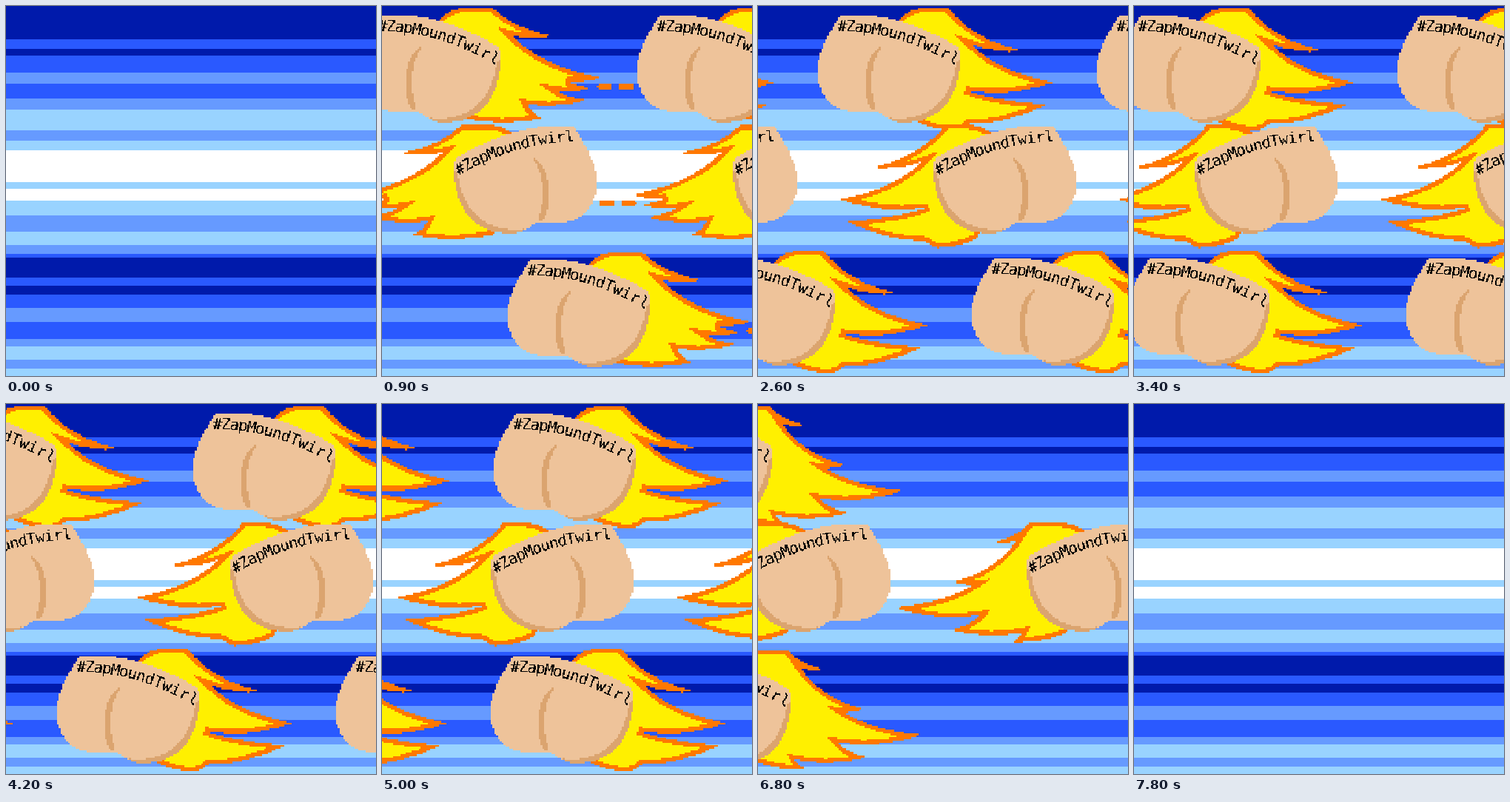
These frames come from a looping animation (500x500 px, 8000 ms). An HTML page with a canvas:

```html
<!DOCTYPE html>
<html lang="en">
<head>
<meta charset="utf-8">
<title>Comet parade</title>
<style>
  html, body { margin: 0; width: 100%; height: 100%; overflow: hidden; background: #001aab; }
  canvas { display: block; width: 100%; height: 100%; image-rendering: pixelated; }
</style>
</head>
<body>
<canvas id="stage" width="500" height="500"></canvas>
<script>
const stage = document.getElementById('stage').getContext('2d');
const LABEL = '#ZapMoundTwirl';
const STEP = 100, STEPS = 80, GAP = 377;
const SPRITE_W = 380, SPRITE_H = 180, BODY_W = 195;
const SKIN = '#eec39a', SHADE = '#dba46f', ORANGE = '#ff7800', YELLOW = '#fff000';

// Background: colour key and lower edge of each stripe.
const BLUES = { D: '#001aab', M: '#2a59ff', L: '#669aff', P: '#99d3ff', W: '#ffffff' };
const STRIPES = 'D45 M58 D67 M90 L105 M125 L140 P168 L182 P195 W238 P247 W263 P283 L305 ' +
  'P323 L335 M340 D367 M378 D390 M408 L427 M450 L460 P478 L490 P500';

const BODY = 'M34,12 L62,12 Q120,14 190,54 Q198,62 195,80 Q187,156 120,157 Q98,157 84,142 ' +
  'L52,142 Q18,142 6,110 Q-11,78 34,12Z';
const CREASE = 'M87,55 Q66,68 67,110 Q68,132 76,140 L82,139 Q75,125 75,100 Q76,72 88,57Z';
const UNDERSIDE = 'M195,70 L195,80 Q187,156 120,157 Q105,157 98,151 L118,152 Q178,148 190,78Z';

// The fire's four poses: crown, then tips and notches in turn, ending under the body.
const FLAMES = [
  { keys: '190,2 239,28 208,26 293,82 266,86 372,117 258,127 298,147 200,150 214,163 140,150' },
  { keys: '185,3 265,40 209,39 331,97 284,101 318,110 270,114 311,127 230,132 251,151 140,150', sparks: 2 },
  { keys: '178,2 277,60 210,52 321,103 202,114 311,133 206,159 190,168 135,155' },
  { keys: '184,2 258,44 210,42 310,93 272,97 350,112 236,124 305,141 202,154 206,162 140,152' }
];

// Label curves as quadratic start, control and end points.
const ARCS = { left: [30, 27, 110, 25, 193, 74], right: [3, 73, 75, 29, 163, 26] };

// c: place of the first one at time zero, v: pixels per step.
const ROWS = [
  { side: 'left', c: 504.6, v: -59.91, count: 10, y: () => 0 },
  { side: 'left', c: 502.8, v: -37.33, count: 6, y: pose => pose < 2 ? 330 : 328 },
  { side: 'right', c: -199.6, v: 74.8, count: 14, y: () => 150 }
];

// Edges fall steeply out of a notch and flatten to the tip; undersides sag a little.
function flamePath({ keys, sparks = 0 }) {
  const points = keys.split(' ').map(p => p.split(',').map(Number));
  const path = new Path2D();
  path.moveTo(112, 18);
  path.quadraticCurveTo(128, 2, 150, 2);
  path.lineTo(...points[0]);
  for (let i = 1; i < points.length; i++) {
    const [x0, y0] = points[i - 1], [x, y] = points[i];
    const dx = x - x0, dy = y - y0;
    if (i % 2) path.quadraticCurveTo(x0 + 0.35 * dx, y0 + 0.75 * dy, x, y);
    else path.quadraticCurveTo(x0 + dx / 2, y0 + dy / 2 + 0.12 * Math.abs(dx), x, y);
  }
  path.closePath();
  for (let i = 0; i < sparks; i++) path.rect(326 + 29 * i, 106, 20, 5);
  return path;
}

function makeCanvas(w, h) {
  const canvas = document.createElement('canvas');
  canvas.width = w;
  canvas.height = h;
  return canvas;
}

// Paints one flat colour in hard-edged cells.
function addLayer(target, cell, color, paint) {
  const w = SPRITE_W / cell, h = SPRITE_H / cell;
  const layer = makeCanvas(w, h);
  const ctx = layer.getContext('2d');
  ctx.scale(1 / cell, 1 / cell);
  ctx.fillStyle = color;
  paint(ctx);
  const image = ctx.getImageData(0, 0, w, h);
  const rgb = [1, 3, 5].map(i => parseInt(color.slice(i, i + 2), 16));
  for (let i = 0; i < image.data.length; i += 4) {
    const on = image.data[i + 3] > 115;
    image.data.set([...rgb, on ? 255 : 0], i);
  }
  ctx.putImageData(image, 0, 0);
  target.drawImage(layer, 0, 0, SPRITE_W, SPRITE_H);
}

function writeLabel(ctx, [x0, y0, x1, y1, x2, y2]) {
  ctx.font = '21px "DejaVu Sans Mono", monospace';
  ctx.textAlign = 'center';
  [...LABEL].forEach((letter, i) => {
    const t = (i + 0.5) / LABEL.length, s = 1 - t;
    const x = s * s * x0 + 2 * s * t * x1 + t * t * x2;
    const y = s * s * y0 + 2 * s * t * y1 + t * t * y2;
    const angle = Math.atan2(s * (y1 - y0) + t * (y2 - y1), s * (x1 - x0) + t * (x2 - x1));
    ctx.save();
    ctx.translate(x, y);
    ctx.rotate(angle);
    ctx.fillText(letter, 0, 7);
    ctx.restore();
  });
}

function makeSprite(side, flame) {
  const canvas = makeCanvas(SPRITE_W, SPRITE_H);
  const ctx = canvas.getContext('2d');
  ctx.imageSmoothingEnabled = false;
  const mirrored = side === 'right';
  const shape = (color, paint, drop = 0) => addLayer(ctx, 2.5, color, c => {
    if (mirrored) {
      c.translate(SPRITE_W, drop);
      c.scale(-1, 1);
    }
    paint(c);
  });

  const fire = flamePath(flame);
  shape(ORANGE, c => c.fill(fire), 8);
  shape(YELLOW, c => {
    c.fill(fire);
    c.globalCompositeOperation = 'destination-out';
    c.lineWidth = 12;
    c.miterLimit = 5;
    c.stroke(fire);
  }, 8);
  for (const [color, outline] of [[SKIN, BODY], [SHADE, CREASE], [SHADE, UNDERSIDE]]) {
    shape(color, c => c.fill(new Path2D(outline)));
  }
  addLayer(ctx, 1.25, '#000000', c => {
    if (mirrored) c.translate(SPRITE_W - BODY_W, 0);
    writeLabel(c, ARCS[side]);
  });
  return canvas;
}

const sprites = {};
for (const side of ['left', 'right']) sprites[side] = FLAMES.map(f => makeSprite(side, f));

function drawStripes() {
  let top = 0;
  for (const stripe of STRIPES.split(' ')) {
    const bottom = +stripe.slice(1);
    stage.fillStyle = BLUES[stripe[0]];
    stage.fillRect(0, top, 500, bottom - top);
    top = bottom;
  }
}

function draw(time) {
  const n = Math.floor(time / STEP) % STEPS;
  const pose = n % FLAMES.length;
  drawStripes();
  for (const { side, c, v, count, y } of ROWS) {
    const inset = side === 'right' ? SPRITE_W - BODY_W : 0;
    for (let k = 0; k < count; k++) {
      const x = Math.round(c + v * n - Math.sign(v) * GAP * k) - inset;
      if (x < 500 && x > -SPRITE_W) stage.drawImage(sprites[side][pose], x, y(pose));
    }
  }
}

const start = performance.now();
function tick() {
  draw(performance.now() - start);
  requestAnimationFrame(tick);
}
tick();
</script>
</body>
</html>
```
